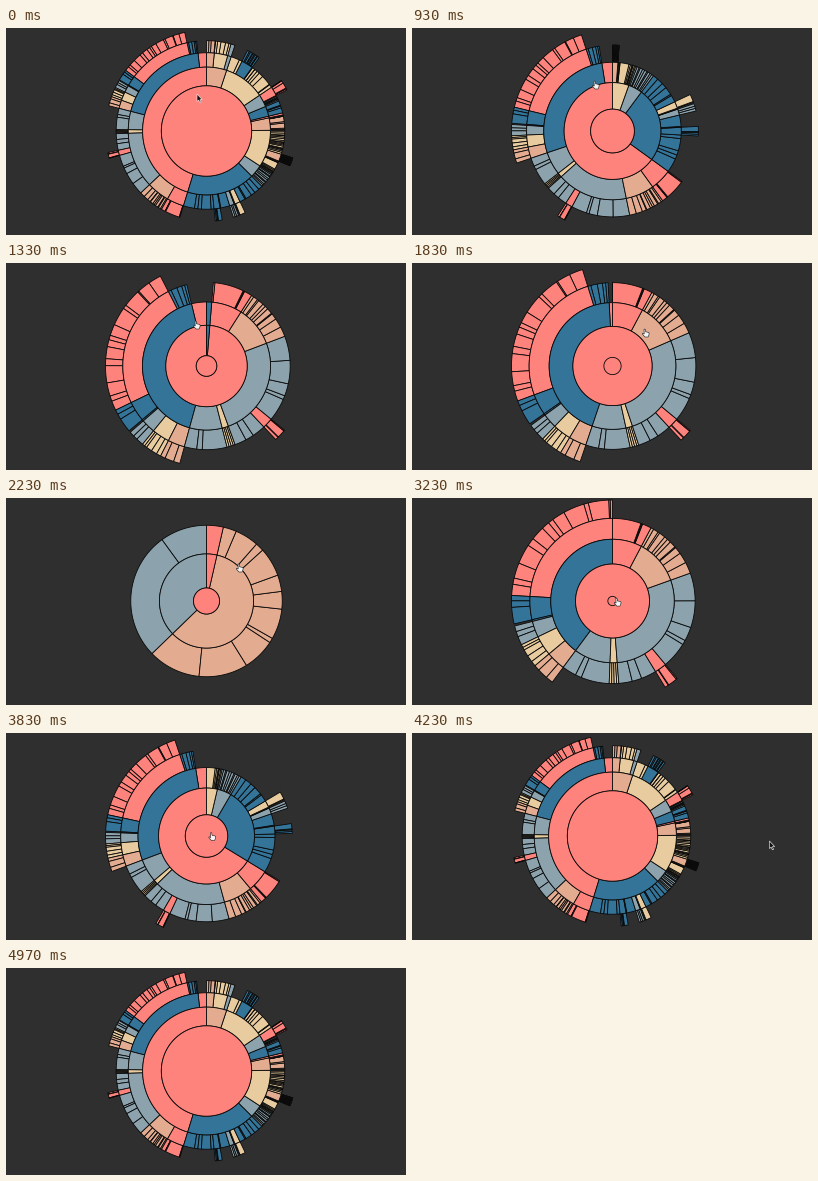
Recreate the animation shown at these times as a matplotlib script. Size 400 by 207 pixels, loop 5010 ms.

```python
import numpy as np
import matplotlib.pyplot as plt
from matplotlib.animation import FuncAnimation
from matplotlib.collections import PolyCollection
from matplotlib.patches import Polygon

W, H, DPI = 400, 207, 64
STEP, LOOP = 30, 5010
CX, CY, RADIUS, HOLE = 200.5, 103, 101, 10
LEVELS = 5
BACK, LINE = "#2f2f2f", "#0a0a0a"
# coral, tan, khaki, grey, blue
CYCLE = ["#ff837d", "#e3ab90", "#e8cc9f", "#8ca3ae", "#347499"]

rng = np.random.default_rng(4)


def group(name, *kids):
    return name, kids


def shares(n, total, spread=0.6):
    w = rng.uniform(1 - spread, 1 + spread, n)
    return list(total * w / w.sum())


# Package tree: groups are named, leaves are file sizes in bytes.
analytics = group(
    "analytics",
    group("cluster", 3938, 3812, 6714, 743),
    group("graph", 3534, 5731, 7840, 5914, 3416),
    group("optimization", 7074))
animate = group(
    "animate", 17010, 5842, group("interpolate", *shares(9, 23081)),
    1041, 5176, 449, 5593, 5534, 9201, 19975, 1116, 6006)
data = group(
    "data", group("converters", 721, 4294, 9800, 1314, 2220),
    *shares(6, 11935))
display = group("display", 8833, 1732, 3623, 10066)
physics = group("physics", 1082, 1336, 319, 10498, 2822, 9983, 2213, 1681)
query = group(
    "query", *shares(18, 47516, 0.7),
    group("methods", *shares(32, 14326, 0.35)),
    *shares(3, 3367, 0.3), 13896, *shares(6, 10616))
scale = group("scale", *shares(10, 31294, 0.5))
util = group(
    "util", 8258, 10001, 8217, 12555, 2324, 10993,
    group("heap", 9354, 1233), 335, 383, 874,
    group("math", 3165, 2815, 3366), 17705, 1486,
    group("palette", 6367, 1229, 2059, 2291),
    5559, 19118, 6887, 6557, 22026)
controls = group("controls", 2138, 3824, 1353, 4665, 2649, 2832,
                 4896, 763, 5222, 7862, 8435)
operator = group(
    "operator",
    group("distortion", 4461, 6314, 3444),
    group("encoder", 3179, 4060, 4138, 1690, 1830),
    group("filter", 5219, 3165, 3509), 1286,
    group("label", 9956, 3899, 3202),
    group("layout", 6725, 3727, 9317, 12003, 4853, 8411, 4864, 3174,
          7881, 12870, 2728, 12348, 870, 9121, 9191),
    2490, 5248, 4190, 2581, 2023)
vis = group(
    "vis",
    group("axis", 1302, 24593, 652, 636, 6703),
    controls,
    group("data", 20544, 19788, 10349, 3301, 19382,
          group("render", 698, 5569, 353, 2247), 11275, 7147, 9930),
    group("events", *shares(4, 7011, 0.3)),
    group("legend", 20859, 4614, 10530),
    operator, 16540)
flare = group("flare", analytics, animate, data, display,
              group("flex", 4116), physics, query, scale, util, vis)


def size(node):
    return sum(map(size, node[1])) if isinstance(node, tuple) else node


def partition(root):
    """Breadth-first list of (node, depth, x0, x1, colour)."""
    total, order, out = size(root), {}, []
    queue = [(root, 0, 0.0, None)]
    for node, depth, x, parent in queue:
        inner = isinstance(node, tuple)
        key = node[0] if inner else parent
        hue = CYCLE[order.setdefault(key, len(order)) % len(CYCLE)]
        out.append((node, depth, x, x + size(node) / total, hue))
        if inner:
            for kid in node[1]:
                queue.append((kid, depth + 1, x, key))
                x += size(kid) / total
    return out


nodes = partition(flare)


def view(target):
    """Focus on a group: x domain, y domain start, inner radius."""
    for node, depth, x0, x1, _ in nodes:
        if node is target:
            return np.array([x0, x1, depth / LEVELS, HOLE if depth else 0])


# (start, middle, end, target) of each zoom in ms
ZOOMS = [(525, 918, 1490, view(vis)),
         (1683, 2058, 2433, view(controls)),
         (2716, 3091, 3466, view(vis)),
         (3466, 3841, 4216, view(flare))]


def ease(t, start, mid, end):
    u = np.interp(t, [start, mid, end], [0, 0.5, 1])
    return 4 * u ** 3 if u < 0.5 else 1 - 4 * (1 - u) ** 3


def camera(t):
    cam = view(flare)
    for start, mid, end, target in ZOOMS:
        cam = cam + (target - cam) * ease(t, start, mid, end)
    return cam


def sector(a0, a1, r0, r1):
    a = np.linspace(a0, a1, int(r1 * (a1 - a0) / 1.5) + 3)
    rim = np.column_stack([np.sin(a), -np.cos(a)])
    if a1 - a0 > 2 * np.pi - 1e-4:
        pts = rim * r1
    elif r0 < 0.05:
        pts = np.vstack([rim * r1, [[0, 0]]])
    else:
        pts = np.vstack([rim * r1, rim[::-1] * r0])
    return pts + (CX, CY)


def sunburst(t):
    x0, x1, y0, hole = camera(t)
    s = np.sqrt(max(y0, 0))

    def angle(x):
        return 2 * np.pi * np.clip((x - x0) / (x1 - x0), 0, 1)

    def radius(y):
        return max(0, hole + (RADIUS - hole) * (np.sqrt(y) - s) / (1 - s))

    rings = [radius(i / LEVELS) for i in range(LEVELS + 1)]
    rings[0] = 0
    verts, hues = [], []
    # deepest first, so full discs need no hole
    for _, depth, n0, n1, hue in reversed(nodes):
        a0, a1 = angle(n0), angle(n1)
        if a1 - a0 > 1e-4 and rings[depth + 1] > 0.3:
            verts.append(sector(a0, a1, rings[depth], rings[depth + 1]))
            hues.append(hue)
    return verts, hues


# pointer tip: time, x, y
TRACK = np.array([(0, 191, 66), (60, 191, 66), (480, 182, 53),
                  (950, 182, 53), (1330, 189, 58), (1660, 232, 66),
                  (2430, 232, 66), (2700, 203.5, 100.5),
                  (3960, 204.5, 99.5), (4250, 358, 108)])
ARROW = np.array([(0, 0), (0, 7.6), (1.7, 6.1), (2.9, 8.9), (4.1, 8.4),
                  (2.9, 5.7), (5.2, 5.6)])
HAND = np.array([(0, 0.3), (0.7, 0), (1.3, 0.4), (1.6, 2.8), (4.6, 3.4),
                 (5.2, 4.2), (4.8, 6.4), (4, 8), (1, 8), (-1.7, 5),
                 (-1.4, 4.2), (0.2, 5)])


def pointer(t):
    i = min(np.searchsorted(TRACK[:, 0], t, "right") - 1, len(TRACK) - 2)
    a, b = TRACK[i], TRACK[i + 1]
    u = np.clip((t - a[0]) / (b[0] - a[0]), 0, 1)
    return a[1:] + (b[1:] - a[1:]) * u * u * (3 - 2 * u)


fig = plt.figure(figsize=(W / DPI, H / DPI), dpi=DPI, facecolor=BACK)
ax = fig.add_axes([0, 0, 1, 1])
ax.set(xlim=(0, W), ylim=(H, 0))
ax.axis("off")

px = 72 / DPI
arcs = PolyCollection([], edgecolors=LINE, linewidths=0.85 * px)
ax.add_collection(arcs, autolim=False)
cursor = Polygon(ARROW, closed=True, lw=0.6 * px, zorder=5)
ax.add_patch(cursor)


def draw(i):
    t = i * STEP + 10
    verts, hues = sunburst(t)
    arcs.set_verts(verts)
    arcs.set_facecolor(hues)

    tip = pointer(t)
    over = np.hypot(tip[0] - CX, tip[1] - CY) < RADIUS and t > 120
    cursor.set_xy((HAND if over else ARROW) + tip)
    cursor.set_facecolor("#f4f4f4" if over else "#111111")
    cursor.set_edgecolor("#222222" if over else "#f0f0f0")
    cursor.set_visible(t < 4265)
    return arcs, cursor


anim = FuncAnimation(fig, draw, frames=LOOP // STEP, interval=STEP,
                     repeat=True, blit=False)
plt.show()
```
